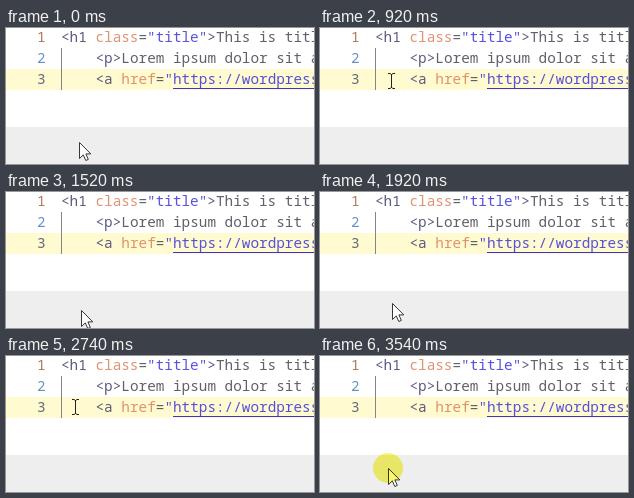
An HTML page for the animation above (3.64 s loop, 308 by 136 pixels).

```html
<!DOCTYPE html>
<html lang="en">
<head>
<meta charset="utf-8">
<style>
html, body { margin: 0; width: 308px; height: 136px; overflow: hidden; background: #fff; }
svg { display: block; }
text { font: 300 14.35px "Noto Sans Mono", "DejaVu Sans Mono", monospace; white-space: pre; fill: #444450; fill-opacity: .85; }
.tag { fill: #3d3d68; }
.attr { fill: #d9805a; }
.str { fill: #3833dc; }
#click { mix-blend-mode: multiply; }
</style>
</head>
<body>
<svg width="308" height="136">
  <rect y="41" width="308" height="21" fill="#fffad0"/>
  <rect y="99" width="308" height="37" fill="#eee"/>
  <rect x="55" y="20" width="1" height="42" fill="#858585"/>
  <text x="31" y="14" style="fill:#a0603c">1</text>
  <text x="31" y="35" style="fill:#4b80bd">2</text>
  <text x="31" y="56" style="fill:#4a5270">3</text>
  <text x="55" y="14"><tspan class="tag">&lt;h1 </tspan><tspan class="attr">class</tspan>=<tspan class="str">"title"</tspan><tspan class="tag">&gt;</tspan>This is title</text>
  <text x="89.5" y="35"><tspan class="tag">&lt;p&gt;</tspan>Lorem ipsum dolor sit amet</text>
  <text x="89.5" y="56"><tspan class="tag">&lt;a </tspan><tspan class="attr">href</tspan>=<tspan class="str">"https://wordpress.org</tspan></text>
  <rect x="167" y="60" width="141" height="1" fill="#3833dc"/>
  <rect id="caret" x="55" y="41" width="2" height="21" fill="#111"/>
  <g id="pointer">
    <path id="arrow" d="M.5.5V16.5L4.3 12.9 6.8 18.5 9.3 17.4 6.9 11.9H11.8Z" fill="#fff" stroke="#222" stroke-width=".9"/>
    <path id="beam" d="M-3-7.5H-1L.5-6.5 2-7.5H4M.5-7V7M-3 7.5H-1L.5 6.5 2 7.5H4" fill="none" stroke="#222"/>
  </g>
  <circle id="click" r="15" fill="#f9f66e"/>
</svg>
<script>
const LOOP = 3640, STEP = 100, OFFSET = 20, EDITOR_BOTTOM = 98;
const home = { x: 73, y: 114 };
const moves = [
  { start: 200, end: 720, x: 70, y: 51 },
  { start: 860, end: 1420, x: 75, y: 118 },
  { start: 1790, end: 2420, x: 69, y: 51 },
  { start: 2700, end: 3100, x: 68, y: 112 }
];
const clamp = p => Math.min(1, Math.max(0, p));
const easeOut = p => 1 - (1 - p) ** 3;
const easeInOut = p => p * p * (3 - 2 * p);
const within = (t, from, to) => t >= from && t < to;
const $ = id => document.getElementById(id);
const show = (id, on) => $(id).setAttribute("visibility", on ? "visible" : "hidden");

// Sideways drift settles early; the vertical sweep eases at both ends
function pointerAt(t) {
  return moves.reduce((pos, move) => {
    const p = clamp((t - move.start) / (move.end - move.start));
    return {
      x: pos.x + (move.x - pos.x) * easeOut(p),
      y: pos.y + (move.y - pos.y) * easeInOut(p)
    };
  }, home);
}

function draw(now) {
  const t = now % LOOP;
  const stepped = Math.floor((t - OFFSET) / STEP) * STEP + OFFSET;
  const { x, y } = pointerAt(stepped);
  const place = `translate(${Math.round(x)} ${Math.round(y)})`;
  const editing = y < EDITOR_BOTTOM;
  $("pointer").setAttribute("transform", place);
  $("click").setAttribute("transform", place);
  show("beam", editing);
  show("arrow", !editing);
  show("click", within(t, 1420, 1520) || t >= 3540);
  show("caret", within(t, 1020, 1420) || within(t, 2940, 3540));
}

const begin = performance.now();
function tick() {
  draw(performance.now() - begin);
  requestAnimationFrame(tick);
}
tick();
</script>
</body>
</html>
```
